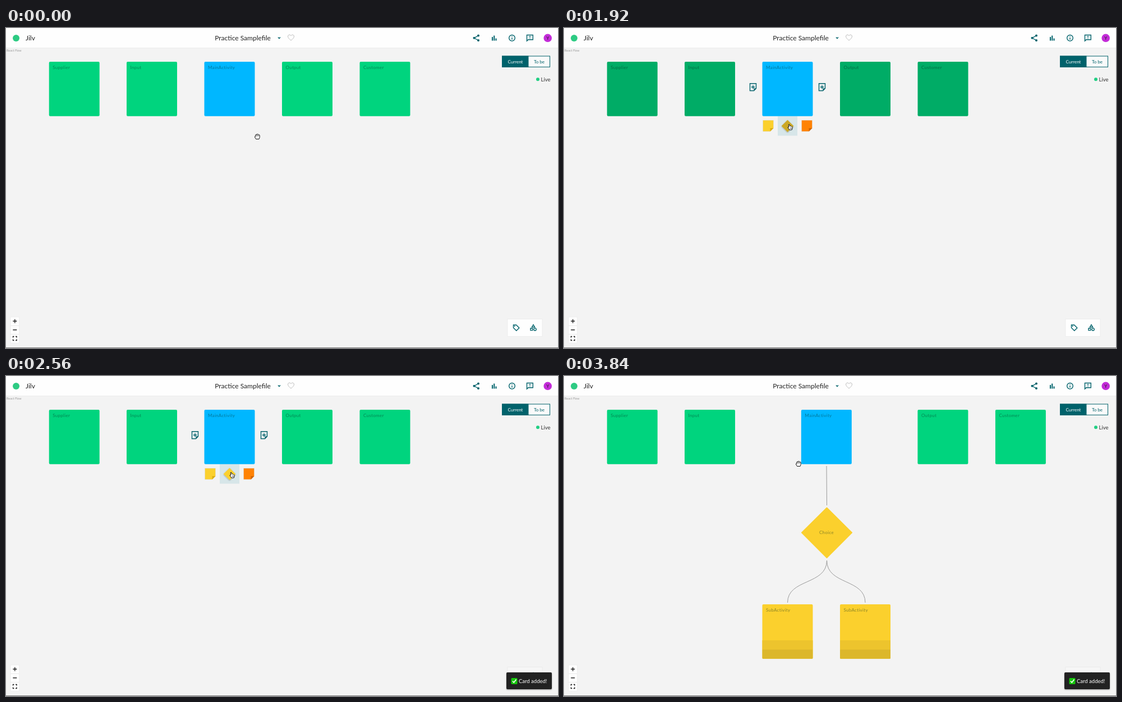
Animation, 984 px wide and 569 px high, one loop 3920 ms. Source, as an HTML page:

```html
<!DOCTYPE html>
<html lang="en">
<head>
<meta charset="utf-8">
<title>Process board</title>
<style>
html, body { margin: 0; width: 100%; height: 100%; overflow: hidden; background: #f3f3f3; }
svg { display: block; width: 984px; height: 569px; font-family: Lato, "Open Sans", sans-serif; }
.label { font-size: 8px; letter-spacing: .3px; fill: #062c20; fill-opacity: .45; }
.icon { fill: none; stroke: #00626b; stroke-width: 1.4; }
.solid { fill: #00626b; }
.edge { fill: none; stroke: #999; stroke-width: 1; }
.zoom { fill: none; stroke: #222; stroke-width: 1.4; }
.hand { fill: #fff; stroke: #111; stroke-width: 1; stroke-linejoin: round; }
</style>
</head>
<body>
<svg viewBox="0 0 984 569">
  <defs>
    <filter id="shadow" x="-40%" y="-40%" width="180%" height="180%">
      <feDropShadow dx="0" dy="1" stdDeviation="1.3" flood-opacity=".35"/>
    </filter>
    <g id="add">
      <path class="icon" d="M-5.5-6.3h11v8.8l-4 4h-7z"/>
      <path class="solid" d="M6 2.3l-4.5 4.5v-4.5z"/>
      <path class="icon" d="M-3.2 0h6.4M0-3.2v6.4"/>
    </g>
    <path id="note" d="M-9.5-10h19v14l-6 6h-13z"/>
    <g id="grab" class="hand">
      <path d="M-2.5 4.5L-4.5 1Q-4.7-.7-3-.2L-3.5-2.5Q-3-4-1.8-3Q-1.3-5 .3-4Q1.6-4.9 2.3-3.2Q4.2-3.6 4.2-1.6V1.5L3 4.5z"/>
      <path d="M-1.6-2.8l.4 2.3M.4-3.4v2.8M2.3-2.9l-.2 2.4" stroke-width=".7"/>
    </g>
    <g id="point" class="hand">
      <path d="M-1.2 5L-3.9 1Q-4-.7-2.2.3L-2.7-4Q-2.1-5.6-1-4.2L-.4-1.6Q.6-2.4 1.3-1.2Q2.3-1.8 2.8-.7Q4.2-.9 4.2.6L3.3 5z"/>
      <path d="M.4 1v2M2.2 1v2" stroke-width=".7"/>
    </g>
  </defs>

  <rect width="984" height="569" fill="#f3f3f3"/>
  <rect y="35" width="984" height="1" fill="#ececec"/>
  <rect width="984" height="35" fill="#fefefe"/>
  <circle cx="18" cy="18" r="6" fill="#2dcb83"/>
  <text x="35" y="22" font-size="12" fill="#222">Jilv</text>
  <text x="422" y="22" font-size="12" text-anchor="middle" fill="#222">Practice Samplefile</text>
  <path class="icon" d="M485 16.5l2 2 2-2"/>
  <path d="M508 22C504 18.8 502.6 17.2 502.6 15C502.6 11.7 506.5 11 508 13.8C509.5 11 513.4 11.7 513.4 15C513.4 17.2 512 18.8 508 22z" fill="none" stroke="#bbb"/>

  <path class="icon" d="M842 13.5L834.5 17.8L842 22"/>
  <g class="solid">
    <circle cx="842" cy="13.5" r="2"/><circle cx="834.5" cy="17.8" r="2"/><circle cx="842" cy="22" r="2"/>
    <path d="M866 16h2v6.5h-2zM869.2 13.5h2v9h-2zM872.5 18.5h2v4h-2z"/>
  </g>
  <circle class="icon" cx="902" cy="17.8" r="5.3"/>
  <path class="icon" d="M902 14.7v1.3M902 17.2v3.6"/>
  <path class="icon" d="M928.5 23v-10.5h10.8v8.2h-8.5z"/>
  <path class="icon" d="M934 14v3M934 18v1.3"/>
  <circle cx="965.7" cy="17.8" r="7.3" fill="#c32bd8"/>
  <text x="965.7" y="20.8" font-size="8" text-anchor="middle" fill="#222">Y</text>

  <text x="1" y="42" font-size="5.5" fill="#999">React Flow</text>
  <rect x="884.5" y="50" width="85" height="19.3" fill="#fafafa" stroke="#00626b"/>
  <rect x="884" y="49.5" width="47.5" height="20.3" fill="#00626b"/>
  <text x="908" y="62.5" font-size="8" text-anchor="middle" fill="#fff">Current</text>
  <text x="950.5" y="62.5" font-size="8" text-anchor="middle" fill="#00626b">To be</text>
  <circle cx="948" cy="91.3" r="3" fill="#20cf83"/>
  <text x="953.5" y="94.5" font-size="9.5" fill="#333">Live</text>

  <rect x="8" y="514" width="15.5" height="46" fill="#fefefe" stroke="#e8e8e8" stroke-width=".6"/>
  <path d="M8 529.3h15.5M8 544.5h15.5" stroke="#e8e8e8"/>
  <path class="zoom" d="M12.3 521.3h7M15.8 517.8v7M12.3 536.8h7"/>
  <path class="zoom" stroke-width="1" d="M12.5 550.5v-2h2M17 548.5h2v2M19 553.5v2h-2M14.5 555.5h-2v-2"/>

  <g id="scene"></g>
  <rect y="568" width="984" height="1" fill="#777"/>
</svg>
<script>
const LOOP = 3920, STEP = 80;
const GREEN = '#00d47e', BLUE = '#00b7ff', YELLOW = '#fbd02d';
const scene = document.getElementById('scene');

// time, x, y of the pointer
const path = [
  [0, 448, 193], [480, 412, 140], [640, 410, 138], [720, 410, 138],
  [1200, 404, 166], [1280, 404, 172], [1360, 403, 180], [1520, 403, 176],
  [3600, 403, 176], [3840, 418, 156]
];

const mix = (a, b, k) => a + (b - a) * k;
const ramp = (t, from, to) => Math.max(0, Math.min(1, (t - from) / (to - from)));
const easeOut = k => 1 - (1 - k) ** 3;

function pointer(t) {
  const i = path.findIndex(p => p[0] > t);
  if (i < 0) return path[path.length - 1].slice(1);
  const [a, b] = [path[i - 1], path[i]];
  const k = ramp(t, a[0], b[0]);
  return [mix(a[1], b[1], k), mix(a[2], b[2], k)];
}

const use = (id, x, y, attrs = '') => `<use href="#${id}" x="${x}" y="${y}" ${attrs}/>`;
const rect = (x, y, w, h, fill, attrs = '') =>
  `<rect x="${x}" y="${y}" width="${w}" height="${h}" fill="${fill}" ${attrs}/>`;
const dimmed = (k, parts) => `<g style="filter:brightness(${1 - .19 * k})">${parts}</g>`;

function card(x, y, fill, name) {
  return rect(x, y, 90, 96.7, fill, 'rx="2"') +
    `<text class="label" x="${x + 6.5}" y="${y + 13}">${name}</text>`;
}

function subCard(x) {
  return card(x, 406, YELLOW, 'SubActivity') +
    rect(x, 470, 90, 17, '#edc42d') + rect(x, 486.5, 90, 16.2, '#dcb72b', 'rx="1"');
}

function branch() {
  return `<path class="edge" d="M468 160L468.5 230M468.5 328C468.5 372 398.5 360 398.5 403M468.5 328C468.5 372 537 360 537 403"/>
    <path d="M468.5 234.5L513 278.5L468.5 323L424 278.5z" fill="${YELLOW}" stroke="${YELLOW}" stroke-width="2" stroke-linejoin="round"/>
    <text class="label" x="468" y="281" text-anchor="middle">Choice</text>` +
    subCard(353.5) + subCard(492);
}

function note(x, fill, fold) {
  return use('note', x, 174, `fill="${fill}" stroke="#ddd" stroke-width=".6"`) +
    `<path d="M${x + 9.5} 178l-6 6v-6z" fill="${fold}"/>`;
}

function options(cx, busy) {
  const diamond = `<path d="M${cx} 163.5l10.8 10.8l-10.8 10.8l-10.8-10.8z" fill="${YELLOW}" filter="url(#shadow)"/>`;
  return rect(cx - 17.5, 157, 35, 34.5, '#d7e6e9') +
    note(cx - 34.5, YELLOW, '#dcae12') + dimmed(busy, diamond) +
    note(cx + 34.5, '#ff8204', '#cf6400');
}

function tools(covered) {
  return rect(894, 517.5, 62, 31, covered ? '#f6f6f6' : '#fefefe', 'stroke="#e9e9e9" stroke-width=".7"') +
    `<path class="icon" d="M904.5 528h5l5.3 5.3l-5 5l-5.3-5.3z"/><circle class="solid" cx="906.7" cy="530.2" r="1"/>
    <path class="icon" d="M940 527.5l2.6 4.3h-5.2zM935 534h3.6v3.6h-3.6z"/><circle class="icon" cx="943" cy="535.8" r="2.2"/>`;
}

function toast(opacity) {
  return `<g opacity="${opacity}">` + rect(892, 527, 81, 30, '#222', 'rx="2" filter="url(#shadow)"') +
    rect(900.5, 537, 11, 11, '#16c60c', 'rx="1.5"') +
    `<path d="M903 542.5l2.3 2.5l4.2-5.5" fill="none" stroke="#fff" stroke-width="1.6"/>
    <text x="914" y="545.5" font-size="9.5" fill="#fff">Card added!</text></g>`;
}

function draw(t) {
  const busy = ramp(t, 1760, 1920) - ramp(t, 2400, 2560);
  const toastIn = ramp(t, 2060, 2240) ** 2;
  const shift = easeOut(ramp(t, 2560, 2960));
  const hover = t >= 320 && t < 3760;
  const picking = t >= 1120 && hover;
  const main = 353.5 + 69.3 * shift, cx = main + 45;
  const right = 138.4 * shift;
  const [x, y] = pointer(t);

  let out = shift ? branch() : '';
  out += dimmed(busy,
    card(76.7, 60, GREEN, 'Supplier') + card(215, 60, GREEN, 'Input') +
    card(492 + right, 60, GREEN, 'Output') + card(630.5 + right, 60, GREEN, 'Customer'));
  out += card(main, 60, BLUE, 'MainActivity');
  if (hover) {
    out += use('add', cx - 61.5, 105) + use('add', cx + 61.5, 105);
    out += picking ? options(cx, busy) : use('add', cx, 174);
  }
  out += tools(toastIn > .1);
  if (toastIn) out += toast(toastIn);
  scene.innerHTML = out + use(picking ? 'point' : 'grab', x, y);
}

let last = -1;
function tick() {
  const t = Math.floor(performance.now() % LOOP / STEP) * STEP;
  if (t !== last) draw(last = t);
  requestAnimationFrame(tick);
}
tick();
</script>
</body>
</html>
```
